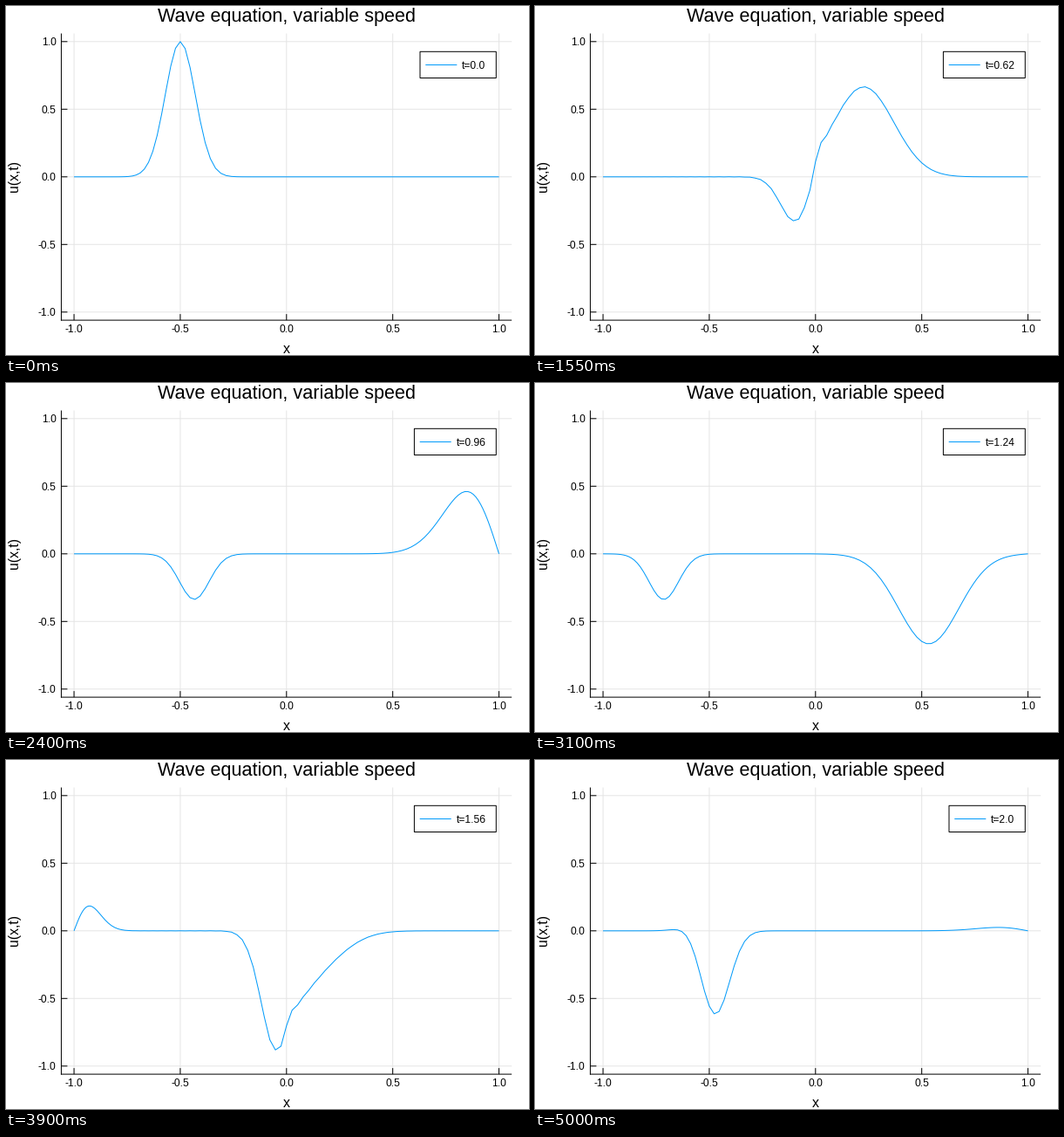
A matplotlib script that plays this animation: 600x400 px, repeating every 5050 ms.

```python
import numpy as np
import matplotlib
import matplotlib.pyplot as plt
from matplotlib.animation import FuncAnimation
from matplotlib.patches import Rectangle

W, H, DPI = 600, 400, 100
FRAMES, INTERVAL, DT = 101, 50, 0.02
M = 120
BLUE = "#009afa"
PT = 72 / DPI  # points per pixel

matplotlib.rcParams["font.family"] = "Liberation Sans"


def cheb(m):
    """Chebyshev points on [-1, 1] and their differentiation matrix."""
    k = np.arange(m + 1)
    x = -np.cos(k * np.pi / m)
    c = np.where((k == 0) | (k == m), 2.0, 1.0) * (-1.0) ** k
    d = np.outer(c, 1 / c) / (x[:, None] - x[None, :] + np.eye(m + 1))
    return x, d - np.diag(d.sum(axis=1))


def solve():
    """u_t = z_x, z_t = c(x)^2 u_x with u = 0 at both ends."""
    x, d = cheb(M)
    # The middle point still belongs to the slow half
    speed = np.where(x > 1e-9, 2.0, 1.0)
    n = M - 1
    a = np.zeros((n + M + 1, n + M + 1))
    a[:n, n:] = d[1:-1]
    a[n:, :n] = speed[:, None] ** 2 * d[:, 1:-1]

    # Fourth-order Runge-Kutta propagator over one frame
    sub = 128
    ha = a * DT / sub
    eye = np.eye(len(a))
    step = eye + ha @ (eye + ha / 2 @ (eye + ha / 3 @ (eye + ha / 4)))
    step = np.linalg.matrix_power(step, sub)

    u = np.exp(-100 * (x + 0.5) ** 2)
    w = np.concatenate([u[1:-1], -u])
    waves = []
    for _ in range(FRAMES):
        waves.append(np.concatenate([[0], w[:n], [0]]))
        w = step @ w
    return x, np.array(waves)


def px(x):
    return 321.8 + 243.75 * x


def py(y):
    return 195.8 - 155 * y


fig = plt.figure(figsize=(W / DPI, H / DPI), dpi=DPI, facecolor="white")
ax = fig.add_axes([0, 0, 1, 1])
ax.set_xlim(0, W)
ax.set_ylim(H, 0)
ax.axis("off")


def line(xs, ys, color="black", z=2):
    return ax.plot(xs, ys, color=color, lw=PT, zorder=z, snap=False,
                   solid_capstyle="butt")[0]


def label(x, y, s, size, ha="center", **kw):
    return ax.text(x, y, s, fontsize=size * PT, ha=ha, va="baseline",
                   zorder=6, **kw)


LEFT, RIGHT, TOP, BOTTOM = px(-1.06), px(1.06), py(1.06), py(-1.06)

for v in (-1, -0.5, 0, 0.5, 1):
    gx, gy = px(v), py(v)
    line([gx, gx], [TOP, BOTTOM], "#e5e5e5", 1)
    line([LEFT, RIGHT], [gy, gy], "#e5e5e5", 1)
    line([gx, gx], [BOTTOM, BOTTOM - 7])
    line([LEFT, LEFT + 7], [gy, gy])
    label(gx, 374.2, f"{v:.1f}", 12)
    label(57.5, gy + 4.3, f"{v:.1f}", 12, ha="right")
line([LEFT, LEFT], [TOP, BOTTOM + 0.5])
line([LEFT - 0.5, RIGHT], [BOTTOM, BOTTOM])

label(322.5, 18, "Wave equation, variable speed", 21.7)
label(322, 398, "x", 16)
label(14.5, 195.3, "u(x,t)", 15.7, rotation=90, rotation_mode="anchor")

grid, waves = solve()
curve = line(px(grid), py(waves[0]), BLUE, 3)

box = Rectangle((475, 52.3), 87.3, 30.2, fc="white", ec="black", lw=PT,
                zorder=4, snap=False)
ax.add_patch(box)
key = line([0, 0], [67.5, 67.5], BLUE, 5)
time_text = label(523.5, 72.2, "", 12, ha="left")


def draw(i):
    curve.set_ydata(py(waves[i]))
    s = f"t={round(i * DT, 2)}"
    start = 523.3 if len(s) == 5 else 516.7
    box.set_x(start - 48.3)
    box.set_width(562.3 - box.get_x())
    key.set_xdata([start - 42, start - 6])
    time_text.set_x(start)
    time_text.set_text(s)
    return curve, box, key, time_text


anim = FuncAnimation(fig, draw, frames=FRAMES, interval=INTERVAL,
                     repeat=True, repeat_delay=0, blit=False)
plt.show()
```
